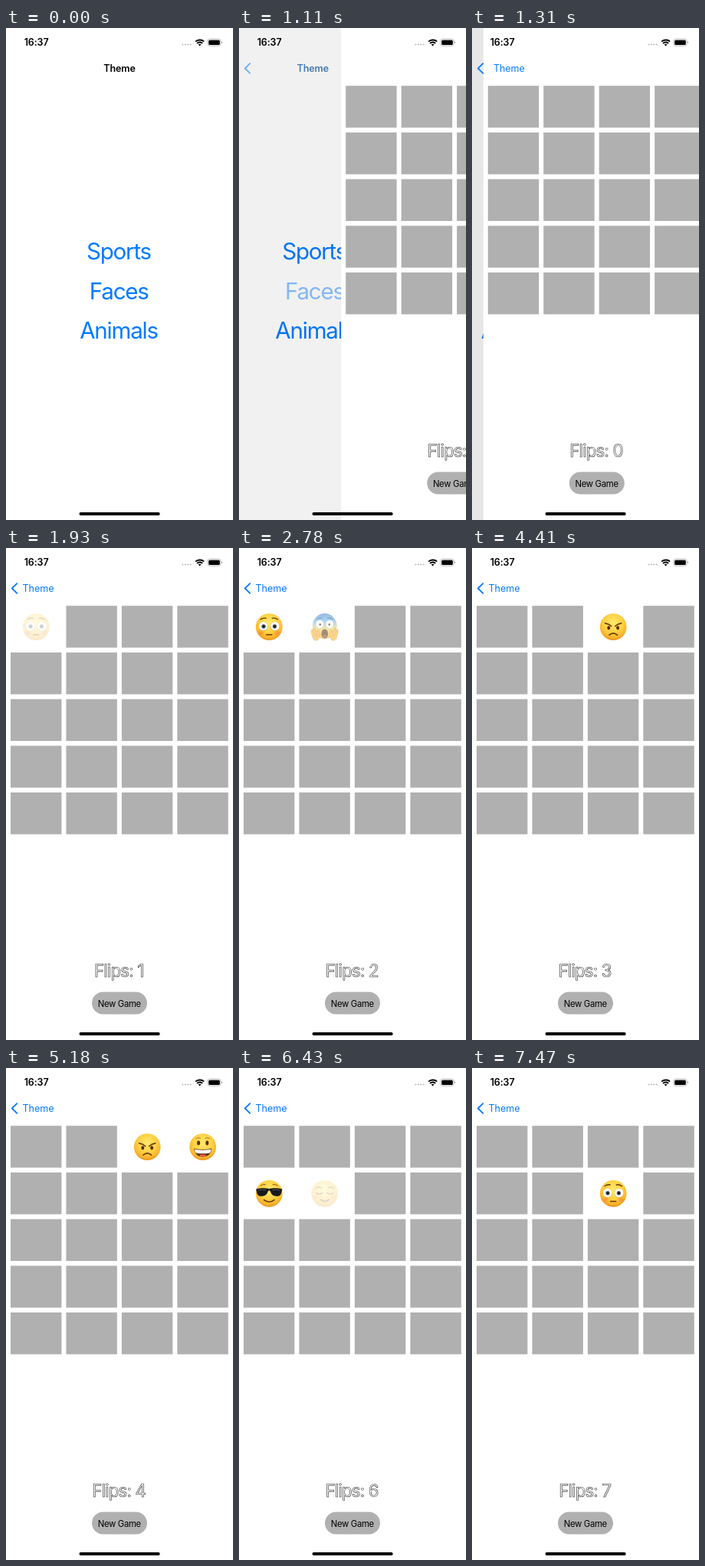
An HTML page that plays this animation: 296x640 px, repeating every 8 s.

```html
<!DOCTYPE html>
<html lang="en">
<head>
<meta charset="utf-8">
<title>Memory game</title>
<style>
html, body { margin: 0; width: 100%; height: 100%; overflow: hidden; background: #fff; }
svg { display: block; width: 296px; height: 640px; }
text { font-family: Inter, Roboto, "Liberation Sans", sans-serif; text-anchor: middle; }
.big { font-size: 29.5px; letter-spacing: -1.2px; fill: #007aff; }
.bold { font-size: 12.5px; font-weight: 600; letter-spacing: -.1px; }
.back { font-size: 12.6px; letter-spacing: -.1px; fill: #007aff; }
.new { font-size: 11.3px; letter-spacing: -.3px; }
.flips { font-size: 22.2px; letter-spacing: -.8px; fill: #fff; stroke: #222; stroke-width: .6; }
.line { fill: none; stroke-linecap: round; stroke-linejoin: round; }
</style>
</head>
<body>
<svg viewBox="0 0 296 640">
  <defs>
    <radialGradient id="skin" cx=".5" cy=".36" r=".66">
      <stop offset="0" stop-color="#ffea70"/><stop offset=".5" stop-color="#fed345"/>
      <stop offset=".82" stop-color="#f9b42b"/><stop offset="1" stop-color="#e38d1c"/>
    </radialGradient>
    <linearGradient id="fear" x1="0" y1="0" x2="0" y2="1">
      <stop offset="0" stop-color="#3f83d0"/><stop offset=".3" stop-color="#6cb4ea"/>
      <stop offset=".52" stop-color="#c9cf8c"/><stop offset=".68" stop-color="#fdd045"/>
      <stop offset="1" stop-color="#f0a326"/>
    </linearGradient>
    <radialGradient id="blush">
      <stop offset="0" stop-color="#f4743b" stop-opacity=".6"/><stop offset="1" stop-color="#f4743b" stop-opacity="0"/>
    </radialGradient>
  </defs>

  <g id="menu">
    <rect width="296" height="640" fill="#fff"/>
    <text class="big" x="147" y="301">Sports</text>
    <text class="big" x="147.3" y="352.5" id="pick">Faces</text>
    <text class="big" x="147" y="404">Animals</text>
  </g>
  <rect id="dim" width="296" height="640"/>

  <g id="game">
    <rect width="296" height="640" fill="#fff"/>
    <g id="cards"></g>
    <text class="flips" x="147.2" y="557.5" id="count"></text>
    <rect x="112" y="577.5" width="72" height="29" rx="14.5" fill="#b0b0b0"/>
    <text class="new" x="147.8" y="596.5">New Game</text>
  </g>

  <text class="bold" y="57" id="title">Theme</text>
  <g id="back">
    <path class="line" d="M14.3 46.2L7.8 52.5L14.3 58.8" stroke="#007aff" stroke-width="1.8"/>
    <text class="back" y="57" id="backText">Theme</text>
  </g>

  <text class="bold" x="39.6" y="23">16:37</text>
  <g fill="#bcbcbc">
    <circle cx="230.4" cy="21.5" r="1.1"/><circle cx="233.8" cy="21.5" r="1.1"/>
    <circle cx="237.2" cy="21.5" r="1.1"/><circle cx="240.6" cy="21.5" r="1.1"/>
  </g>
  <g class="line" stroke="#000" stroke-width="1.9" style="stroke-linecap:butt">
    <path d="M247.1 17.7A7.8 7.8 0 0 1 258.1 17.7"/>
    <path d="M249.1 20A4.9 4.9 0 0 1 256.1 20"/>
  </g>
  <path d="M252.6 23.6L250.7 21.6A2.8 2.8 0 0 1 254.5 21.6Z"/>
  <rect x="262.9" y="14.4" width="17.2" height="8.8" rx="2.6" fill="none" stroke="#a8a8a8" stroke-width=".8"/>
  <rect x="264.2" y="15.7" width="14.6" height="6.2" rx="1.5"/>
  <path d="M281 17.3A1.6 1.6 0 0 1 281 20.3Z" fill="#a8a8a8"/>
  <rect x="95.5" y="630" width="105.2" height="4" rx="2"/>
</svg>

<script>
const $ = id => document.getElementById(id);
const LOOP = 8000;

const line = (d, width = 1.4, color = '#6b3a0c') =>
  `<path class="line" d="${d}" stroke="${color}" stroke-width="${width}"/>`;
const oval = (x, y, rx, ry, fill) =>
  `<ellipse cx="${x}" cy="${y}" rx="${rx}" ry="${ry}" fill="${fill}"/>`;
const pair = (x, y, rx, ry, fill) => oval(-x, y, rx, ry, fill) + oval(x, y, rx, ry, fill);
// Draws a part and its mirror image
const both = part => part + `<g transform="scale(-1 1)">${part}</g>`;
const head = oval(0, 0, 17.4, 17.4, 'url(#skin)');

const faces = {
  flushed: head + pair(10.5, 8, 5.5, 4.5, 'url(#blush)') +
    pair(7.6, -.6, 6, 6, '#d79a3a') + pair(7.6, -.8, 5.7, 5.7, '#fff') +
    pair(7.2, -.6, 2.7, 2.8, '#56616b') + pair(7.2, -.6, 1.6, 1.7, '#20160f') +
    both(line('M4 -11.3Q8 -12.3 11.2 -9.6', 1.3)) + line('M-3.6 10.2H3.6', 1.6),
  scream: oval(0, -1, 16, 16.5, 'url(#fear)') +
    pair(6.4, -3.6, 4.8, 5.2, '#fff') + pair(6, -3.2, 1.3, 1.5, '#3b2a20') +
    both(line('M3.8 -11.4Q7.5 -12.3 10.2 -9.8', 1.2, '#27558c')) +
    oval(0, 9, 4.3, 6.2, '#5b2d12') + oval(0, 12.2, 2.8, 2, '#8d4a25') +
    both('<path d="M9.2 17.3C6 13 6.4 8 7.6 4.5Q9 3.2 9.8 5.2L10.4 8L13.2 1.8Q15.2 .8 15.1 3L14.3 7L16.2 3.6Q17.8 3.4 17.5 5.4C16.8 11 15.5 16 12.5 17.6Z" fill="#f8b52d" stroke="#cf7c1b" stroke-width=".6"/>' +
      line('M11 8.5L10.2 13M13.7 8L12.8 12', .5, '#cf7c1b')),
  angry: head + pair(5.9, 1.2, 2, 2.6, '#5c2f0d') +
    both(line('M2.4 -.8Q5.6 -4 10.6 -4.7', 1.6)) + line('M-5.2 10.6Q0 6 5.2 10.6', 1.6),
  grin: head + pair(5.6, -5, 2, 3, '#5c2f0d') +
    both(line('M3 -11.2Q5.8 -13 8.6 -10.9', .9, '#a4661b')) +
    '<path d="M-11.4 2.2Q0 4.8 11.4 2.2C11 9.2 6.5 13 0 13S-11 9.2 -11.4 2.2Z" fill="#64330f"/>' +
    '<path d="M-10.8 3.1Q0 5.4 10.8 3.1Q10.5 6.4 9.1 7.8Q0 9.6 -9.1 7.8Q-10.5 6.4 -10.8 3.1Z" fill="#fff"/>' +
    oval(0, 11.3, 4.2, 1.3, '#e2604a'),
  cool: head +
    both(line('M4.8 -11.4Q8 -12.6 10.8 -10.2', 1.1, '#8c5315')) +
    both('<path d="M0 -6.3Q8 -8 17.1 -5.8L16.5 -3.4C15.7 1.8 13.8 3.6 9.4 3.4C5 3.2 2.8 1 1.7 -2.6Q1 -3.8 0 -3.8Z" fill="#17181b"/>' +
      line('M4.4 -4.6Q9 -5.5 13.8 -4.4', .8, '#61666d')) +
    line('M-6.7 8.3Q0 13.6 6.7 8.3', 1.6),
  relieved: head +
    both(line('M3.2 -.8Q7 2.4 11 -.8', 1.4) + line('M4.4 -7.4Q8 -9.9 11.2 -6.8', 1.1)) +
    pair(10.6, 5, 4.5, 3.5, 'url(#blush)') + line('M-5.7 7.8Q0 12.4 5.7 7.8', 1.5)
};

// Card order, with the start and end of each turn
const turns = [
  ['flushed', 1930, 2330], ['scream', 2660, 3110], ['angry', 3980, 4410],
  ['grin', 4750, 5180], ['cool', 5690, 6110], ['relieved', 6430, 6870],
  ['flushed', 7050, 7470]
];
const fade = [.22, .55, .82, .96, 1];
const push = [[890, 0, .25], [1000, .12, .25], [1110, .55, .45], [1210, .84, .7],
  [1310, .95, .9], [1420, .99, 1], [1520, 1, 1]];

const cards = Array.from({ length: 20 }, (_, i) => {
  const x = 6 + i % 4 * 72.45, y = 75.2 + Math.floor(i / 4) * 60.7;
  const face = turns[i] ? faces[turns[i][0]] : '';
  $('cards').insertAdjacentHTML('beforeend',
    `<g transform="translate(${x} ${y})"><rect width="66.4" height="54.4" fill="#b0b0b0"/>` +
    `<g transform="translate(33.3 27.4)">${face}</g></g>`);
  const [back, front] = $('cards').lastElementChild.children;
  return { back, front };
});

function faded(turn, t) {
  if (!turn || t < turn[1]) return 0;
  const step = Math.floor((t - turn[1]) / ((turn[2] - turn[1]) / 4));
  return fade[Math.min(step, 4)];
}

function slide(t) {
  const [, p, glow] = push.findLast(s => t >= s[0]) || [0, 0, 1];
  $('menu').setAttribute('transform', `translate(${-88.8 * p} 0)`);
  $('game').setAttribute('transform', `translate(${296 * (1 - p)} 0)`);
  $('dim').setAttribute('opacity', .1 * p);
  $('pick').setAttribute('opacity', glow);
  const x = 148 - 106 * p ** 1.2;
  $('title').setAttribute('x', x);
  $('backText').setAttribute('x', x);
  $('title').setAttribute('opacity', 1 - p);
  $('back').setAttribute('opacity', p);
}

function render(t) {
  slide(t);
  const flips = turns.filter(turn => t >= turn[1]).length;
  $('count').textContent = 'Flips: ' + flips;
  cards.forEach(({ back, front }, i) => {
    const closing = turns[i - i % 2 + 2];   // the next pair hides this one
    const open = turns[i] && t >= turns[i][1] && !(closing && t >= closing[1]);
    back.setAttribute('opacity', open ? 0 : 1);
    front.setAttribute('opacity', faded(turns[i], t) * (1 - faded(closing, t)));
  });
}

const start = performance.now();
function tick() {
  render((performance.now() - start) % LOOP);
  requestAnimationFrame(tick);
}
tick();
</script>
</body>
</html>
```
